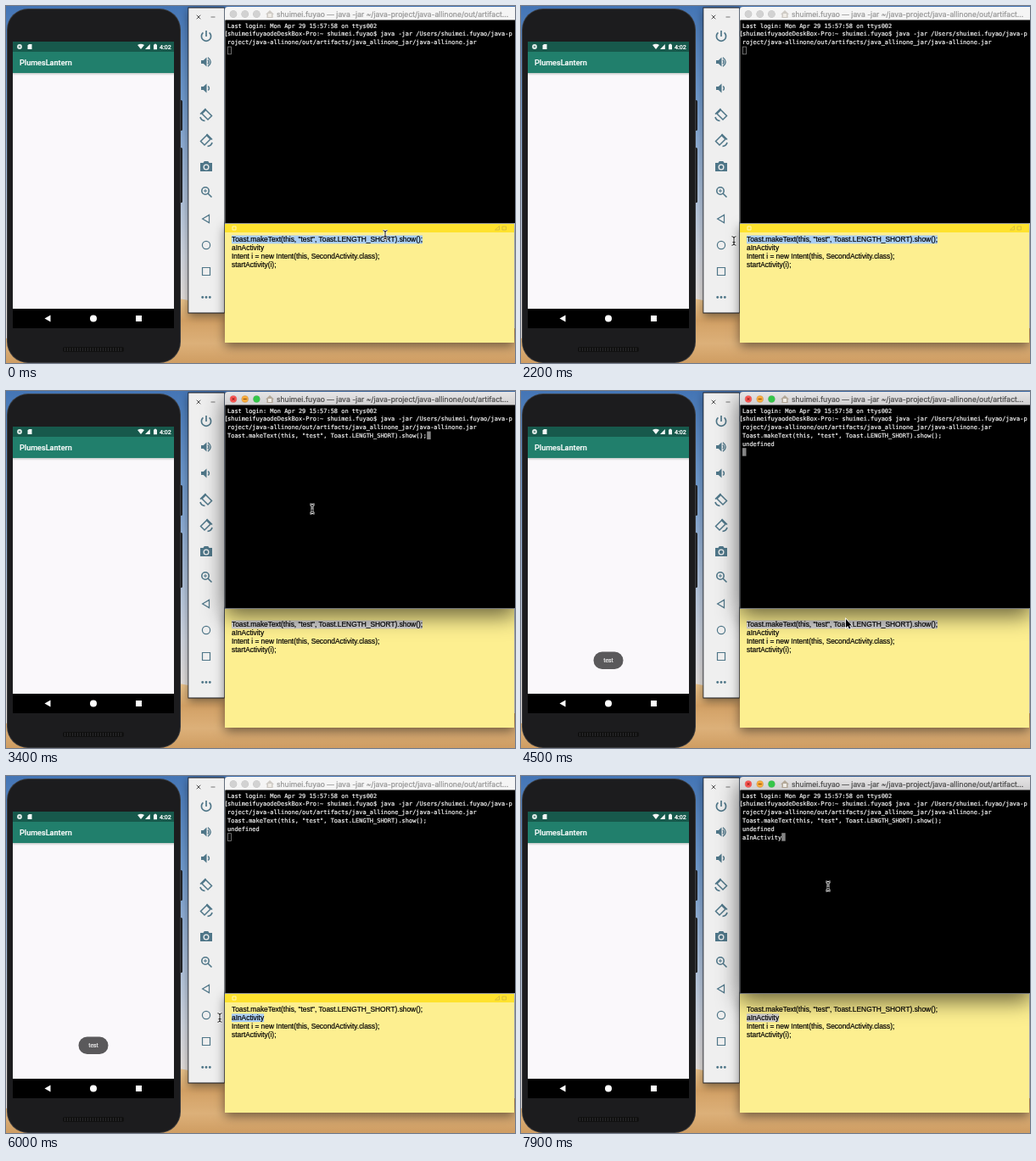
Recreate the animation shown at these times as an HTML page with a canvas. Size 600 px wide and 421 px high, loop 8000 ms.

```html
<!DOCTYPE html>
<html lang="en">
<head>
<meta charset="utf-8">
<title>Emulator and terminal</title>
<style>
html, body { margin: 0; width: 100%; height: 100%; overflow: hidden; background: #000; }
canvas { display: block; width: 600px; height: 421px; }
</style>
</head>
<body>
<canvas id="stage" width="600" height="421"></canvas>
<script>
const c = document.getElementById('stage').getContext('2d');
const LOOP = 8000;
const MONO = '6.98px "DejaVu Sans Mono", monospace';
const NOTE_FONT = '8.37px "Liberation Sans", Arial, sans-serif';
const TITLE_FONT = '8.6px Inter, sans-serif';
const ICON = '#4f7688';
const USER = 'shuimei.fuyao';
const NOTE = [
  'Toast.makeText(this, "test", Toast.LENGTH_SHORT).show();',
  'aInActivity',
  'Intent i = new Intent(this, SecondActivity.class);',
  'startActivity(i);'
];
const SHELL = [
  'Last login: Mon Apr 29 15:57:58 on ttys002',
  `shuimeifuyaodeDeskBox-Pro:~ ${USER}$ java -jar /Users/${USER}/java-p`,
  'roject/java-allinone/out/artifacts/java_allinone_jar/java-allinone.jar'
];
const NOTE_X = 266, LINE = 9.8;

const CLICK = 900, DRAG1 = 1500, DROP1 = 2050, TERM1 = 2950, PASTE1 = 3300, ENTER = 3900,
  RESULT = 4100, NOTE2 = 5150, DRAG2 = 5400, DROP2 = 5850, TOAST_END = 6350, TERM2 = 7050,
  PASTE2 = 7600;

// Pointer path: time, x, y
const PATH = [
  [0, 447, 270], [200, 447, 270], [750, 484, 276], [950, 484, 276], [1300, 510, 277],
  [DRAG1, 510, 277], [DROP1, 251, 277], [2450, 251, 277], [2900, 361, 139], [3950, 361, 139],
  [4450, 383, 273], [4600, 383, 273], [5050, 312, 285], [DRAG2, 312, 285], [DROP2, 252, 285],
  [6450, 252, 285], [6950, 362, 130], [LOOP, 362, 130]
];

const clamp = v => Math.max(0, Math.min(1, v));

function pointer(t) {
  const i = PATH.findIndex(p => p[0] > t);
  const [t0, x0, y0] = PATH[i - 1], [t1, x1, y1] = PATH[i];
  const u = (t - t0) / (t1 - t0), k = u * u * (3 - 2 * u);
  return [x0 + (x1 - x0) * k, y0 + (y1 - y0) * k];
}

function rect(x, y, w, h, fill) {
  c.fillStyle = fill;
  c.fillRect(x, y, w, h);
}

function round(x, y, w, h, r, fill) {
  c.beginPath();
  c.roundRect(x, y, w, h, r);
  c.fillStyle = fill;
  c.fill();
}

function disc(x, y, r, fill) {
  c.beginPath();
  c.arc(x, y, r, 0, 7);
  c.fillStyle = fill;
  c.fill();
}

// A hairline stroke gives the text its slightly heavier weight
function text(s, x, y, font, fill, align = 'left') {
  c.font = font;
  c.fillStyle = c.strokeStyle = fill;
  c.textAlign = align;
  c.lineWidth = .2;
  c.fillText(s, x, y);
  c.strokeText(s, x, y);
}

// Draws an SVG path relative to (x, y), filled or stroked
function shape(d, x, y, color, width = 0) {
  const p = new Path2D(d);
  c.save();
  c.translate(x, y);
  c.lineWidth = width;
  c.fillStyle = c.strokeStyle = color;
  width ? c.stroke(p) : c.fill(p);
  c.restore();
}

function shadowed(alpha, blur, dy, paint) {
  c.save();
  c.shadowColor = `rgba(0,0,0,${alpha})`;
  c.shadowBlur = blur;
  c.shadowOffsetY = dy;
  paint();
  c.restore();
}

function gradient(y0, y1, ...stops) {
  const g = c.createLinearGradient(0, y0, 0, y1);
  stops.forEach(([at, color]) => g.addColorStop(at, color));
  return g;
}

function wallpaper() {
  rect(0, 0, 600, 421, gradient(0, 421, [0, '#4475b5'], [.25, '#6f9ace'], [.5, '#a9bfdc'],
    [.7, '#d3d8e2'], [.82, '#e4dfdc']));
  shape('M0 392 Q100 350 190 344 Q225 345 270 366 L600 380 V421 H0Z', 0, 0,
    gradient(344, 421, [0, '#ecc68f'], [.35, '#d3a165'], [.7, '#dcb079'], [1, '#cf9d62']));
}

function phone() {
  round(204, 111, 4, 36, 1.5, '#222326');
  round(204, 167, 4, 65, 1.5, '#222326');
  round(1, 3, 205, 418, 25, '#3a3b3e');
  round(2, 4, 203, 416, 24, '#1c1c1e');
  round(67, 402, 72, 6, 2, '#111');
  for (let x = 69; x < 138; x += 3) rect(x, 403, 1, 4, '#29292b');

  rect(8, 42, 190, 338, '#faf8fb');
  rect(8, 42, 190, 12, '#17594c');
  rect(8, 54, 190, 25, '#217f6c');
  rect(8, 79, 190, 3, gradient(79, 82, [0, '#c4c9c8'], [1, '#faf8fb']));
  rect(8, 357, 190, 23, '#000');
  text('PlumesLantern', 16, 70, '500 9.1px Roboto, sans-serif', '#fff');

  disc(16, 48, 2.9, '#e6efed');
  disc(16, 48, 1.3, '#6f9a91');
  shape('M-1 -3 H2.5 V3 H-2.5 V-1.4Z', 28, 48, '#f2f7f6');
  shape('M-4 -2 Q0 -4.4 4 -2 L0 3Z', 159, 48, '#f2f7f6');
  shape('M2.8 -3 V3 H-3Z', 167, 48, '#f2f7f6');
  shape('M-1 -3.3 H1 V-2.6 H2 V3.2 H-2 V-2.6 H-1Z', 176, 48, '#f2f7f6');
  text('4:02', 181, 50.6, '500 7px Roboto, sans-serif', '#fff');

  shape('M3.5 -4 V4 L-3.5 0Z', 49, 368.5, '#fff');
  disc(103, 368.5, 4, '#fff');
  rect(153, 365, 7, 7, '#fff');
}

function toolbar() {
  shadowed(.45, 10, 3, () => rect(214.5, 1.5, 43, 361, '#1b1d22'));
  rect(215.3, 2.5, 41.7, 359, '#efefef');
  shape('M-2.3 -2.3 L2.3 2.3 M2.3 -2.3 L-2.3 2.3', 227, 13, '#555', 1);
  shape('M-2.5 0 H2.5', 244, 13, '#777', 1);
  const at = (y, d, w) => shape(d, 236, y, ICON, w);
  at(36, 'M0 -7 V0 M-3.6 -4.6 A5.6 5.6 0 1 0 3.6 -4.6', 1.7);
  const speaker = 'M-6 -2 H-3.2 L.5 -5.5 V5.5 L-3.2 2 H-6Z';
  at(66, speaker);
  at(66, 'M2 -2.5 Q4.2 0 2 2.5 M2 -5.3 Q8.5 0 2 5.3', 1.4);
  at(97, speaker);
  at(97, 'M2.2 -2.6 Q4.6 0 2.2 2.6', 1.5);
  at(128, 'M-.5 -5.5 L6.5 1.5 L2 6 L-5 -1Z', 1.5);
  at(128, 'M-.5 -6.8 L-7 -.5 M-7 3 Q-6 7 -1.5 7.5', 1.7);
  at(158, 'M.5 -5.5 L-6.5 1.5 L-2 6 L5 -1Z', 1.5);
  at(158, 'M.5 -6.8 L7 -.5 M7 3 Q6 7 1.5 7.5', 1.7);
  at(189, 'M-7 -4 H-3.6 L-2.2 -6 H2.2 L3.6 -4 H7 V6 H-7Z');
  disc(236, 190, 3.5, '#efefef');
  disc(236, 190, 2.2, ICON);
  at(219, 'M3.2 -1 A4.2 4.2 0 1 1 -5.2 -1 A4.2 4.2 0 1 1 3.2 -1 M2 2 L6.5 6.5', 1.6);
  at(219, 'M-3 -1 H1 M-1 -3 V1', 1);
  at(251, 'M3.5 -4.6 V4.6 L-4.4 0Z', 1.2);
  at(282, 'M4.6 0 A4.6 4.6 0 1 1 -4.6 0 A4.6 4.6 0 1 1 4.6 0', 1.2);
  at(313, 'M-4.5 -4.5 H4.5 V4.5 H-4.5Z', 1.2);
  [-4.3, 0, 4.3].forEach(dx => disc(236 + dx, 343.5, 1.4, ICON));
}

function toast(t) {
  c.globalAlpha = clamp((t - RESULT) / 250) * clamp((TOAST_END - t) / 250);
  round(85.5, 307.5, 35, 20.5, 10.2, '#5a595b');
  text('test', 103, 320.4, '6.9px Roboto, sans-serif', '#f2f2f2', 'center');
  c.globalAlpha = 1;
}

const noteWidth = s => { c.font = NOTE_FONT; return c.measureText(s).width; };

// Left edge of the letter nearest to the pointer
function snap(line, x) {
  let n = line.length;
  while (n && NOTE_X + noteWidth(line.slice(0, n)) - 2 > x) n--;
  return NOTE_X + noteWidth(line.slice(0, n));
}

function select(row, from, color) {
  const end = NOTE_X + noteWidth(NOTE[row]);
  rect(from, 270.5 + row * LINE, end - from, LINE, color);
}

function note(t, mouseX, focused) {
  shadowed(.5, 12, 4, () => rect(258, 257, 341, 140, '#fdef90'));
  if (focused) {
    rect(258, 257, 341, 10, '#fee22e');
    shape('M-2 -2 H2 V2 H-2Z', 269, 262, '#fff6b5', 1);
    shape('M-2.5 2 L2.5 -2.5 V2Z M6 -2 H10.5 V2 H6Z', 579, 262, '#cdb743', .8);
  }
  const color = focused ? '#a9cdf3' : '#d0cfcf';
  const caret = (x, row) => rect(x, 270.5 + row * LINE, 1, LINE, '#111');
  if (t < CLICK) select(0, NOTE_X, color);
  else if (t < DRAG1) caret(NOTE_X + noteWidth(NOTE[0].slice(0, -3)), 0);
  else if (t < NOTE2) select(0, t < DROP1 ? snap(NOTE[0], mouseX) : NOTE_X, color);
  else if (t < DRAG2) caret(NOTE_X + noteWidth(NOTE[1]), 1);
  else select(1, t < DROP2 ? snap(NOTE[1], mouseX) : NOTE_X, color);
  NOTE.forEach((s, i) => text(s, NOTE_X, 278.4 + i * LINE, NOTE_FONT, '#000'));
}

function terminal(t, focused) {
  const edge = () => round(257.5, 1, 343.5, 256, 4, focused ? '#77797c' : '#9a9a9a');
  focused ? shadowed(.6, 26, 8, edge) : edge();
  round(258, 1, 343, 16, [4, 0, 0, 0],
    focused ? gradient(1, 17, [0, '#e6e5e6'], [1, '#d0cfd0']) : '#f5f5f5');
  rect(258.5, 16.5, 342, 239.5, '#000');

  const lights = focused ? ['#fb5652', '#f6a93b', '#35c649'] : Array(3).fill('#d2d2d2');
  lights.forEach((color, i) => {
    disc(268 + i * 13.7, 9.5, 4.3, focused ? 'rgba(0,0,0,.2)' : '#bdbdbd');
    disc(268 + i * 13.7, 9.5, 3.9, color);
  });
  if (focused) {
    shape('M-1.6 -1.6 L1.6 1.6 M1.6 -1.6 L-1.6 1.6', 268, 9.5, '#7d1512', .9);
    shape('M-2 0 H2', 281.7, 9.5, '#8a4d08', 1);
  }
  shape('M-5 0 L0 -4.6 L5 0 H3.6 V4.4 H-3.6 V0Z', 311, 9.7, focused ? '#b3a898' : '#cfcbc5');
  rect(309, 9, 4, 4, '#efece6');
  text(`${USER} — java -jar ~/java-project/java-allinone/out/artifact...`, 319, 13,
    TITLE_FONT, focused ? '#454545' : '#939393');

  const lines = [...SHELL, t < PASTE1 ? '' : NOTE[0]];
  if (t >= ENTER) lines.push(t < RESULT ? '' : 'undefined');
  if (t >= RESULT) lines.push(t < PASTE2 ? '' : NOTE[1]);
  lines.forEach((s, i) => text(s, 261, 25.6 + i * LINE, MONO, '#f4f4f4'));
  text('[', 257.5, 25.6 + LINE, MONO, '#f4f4f4');

  const last = lines.length - 1;
  const x = 261 + lines[last].length * 4.2, y = 18.2 + last * LINE;
  if (focused) rect(x, y, 4.5, 9.5, '#858585');
  else {
    c.strokeStyle = '#858585';
    c.lineWidth = .8;
    c.strokeRect(x + .5, y + .5, 4, 8.7);
  }
}

function cursor(x, y, arrow) {
  if (arrow) {
    const d = 'M0 -4 V6 L2.3 4 L3.9 7.6 L5.6 6.8 L4 3.4 H7Z';
    shape(d, x, y, '#fff', 1.5);
    shape(d, x, y, '#000');
    return;
  }
  const d = 'M-2.6 -5.2 Q0 -5.2 0 -3.6 Q0 -5.2 2.6 -5.2 M0 -4 V4 M-2.6 5.2 Q0 5.2 0 3.6 Q0 5.2 2.6 5.2 M-1.5 1.6 H1.5';
  shape(d, x, y, '#fff', 2.8);
  shape(d, x, y, '#111', 1);
}

function draw(t) {
  const [x, y] = pointer(t);
  const termFocus = (t >= TERM1 && t < NOTE2) || t >= TERM2;
  wallpaper();
  phone();
  toast(t);
  toolbar();
  note(t, x, !termFocus);
  terminal(t, termFocus);
  cursor(x, y, termFocus && y > 257);
}

const start = performance.now();
function frame() {
  draw((performance.now() - start) % LOOP);
  requestAnimationFrame(frame);
}
frame();
</script>
</body>
</html>
```
